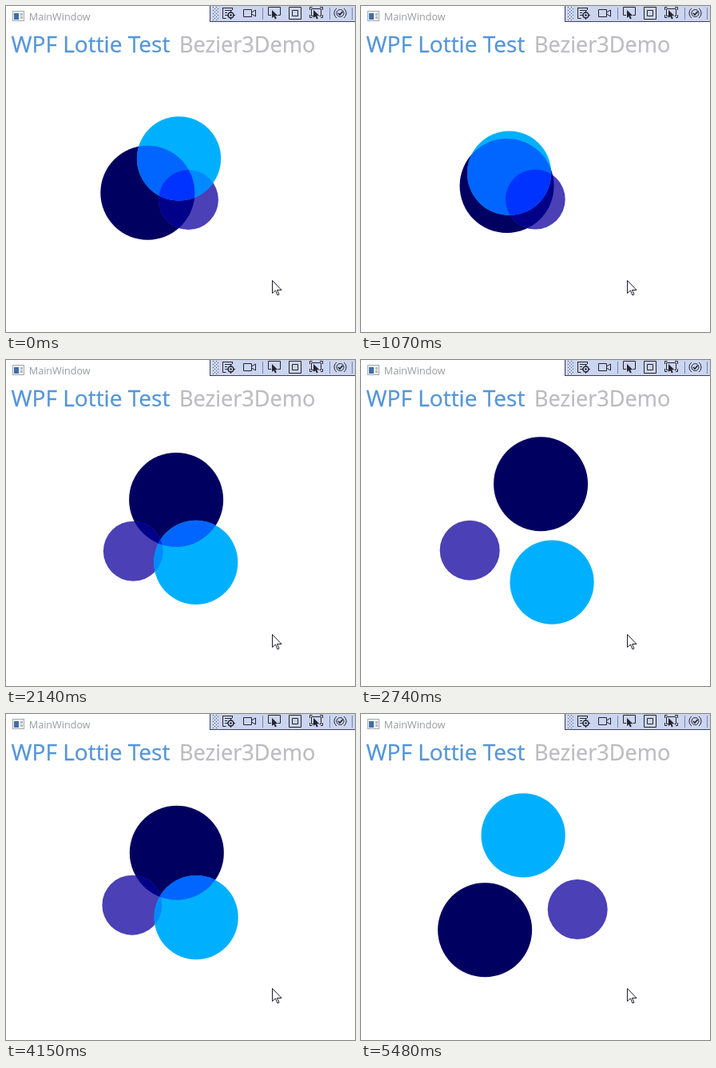
Recreate the animation shown at these times as an HTML page. Size 437 by 408 pixels, loop 5.55 s.

```html
<!DOCTYPE html>
<html lang="en">
<head>
<meta charset="utf-8">
<title>MainWindow</title>
<style>
  html, body { margin: 0; width: 100%; height: 100%; overflow: hidden; background: #fff; }
  svg { display: block; width: 437px; height: 408px; }
  text { font-family: "Open Sans", "Noto Sans", sans-serif; }
  .heading { stroke-width: .3; }
  .icon { fill: none; stroke: #22242e; stroke-width: 1; }
  .solid { fill: #22242e; stroke: none; }
</style>
</head>
<body>
<svg viewBox="0 0 437 408">
  <defs>
    <circle id="navy" r="59"/>
    <circle id="cyan" r="52.6"/>
    <circle id="violet" r="37.5"/>
    <clipPath id="inNavy"><use href="#navy"/></clipPath>
    <clipPath id="inViolet"><use href="#violet"/></clipPath>
    <pattern id="grip" x="259" y="1" width="4" height="4" patternUnits="userSpaceOnUse">
      <path d="M0 0h1v1h-1zM2 2h1v1h-1z" fill="#4a5270"/>
    </pattern>
    <path id="arrow" d="M0 0v10l2.300-2 1.700 3.500 1.800-.9-1.700-3.300h3.200z"/>
  </defs>

  <!-- title bar -->
  <rect x="8.5" y="6.5" width="14" height="12" fill="#f4f5f7" stroke="#a3a9b0"/>
  <rect x="10" y="9" width="6" height="8" fill="#3f6fa8"/>
  <path d="M18 9h3v3h-3zM18 13h3v3h-3z" fill="#b4bac2"/>
  <text x="28.800" y="17.500" font-size="12.600" fill="#999ba0">MainWindow</text>

  <!-- debug toolbar -->
  <rect x="255" width="182" height="20" fill="#38405f"/>
  <rect x="256" width="181" height="19" fill="#ccd5f0"/>
  <rect x="259" y="1" width="7" height="17" fill="url(#grip)"/>
  <path d="M321.500 2v15M405.500 2v15M433.500 2v15" stroke="#7884a8"/>
  <g class="icon">
    <path d="M271 2.500h13M271.500 2v13.500h4M274 5.500h9M274 8.500h3M274 11.500h2M283.500 2v3"/>
    <circle cx="281.500" cy="11.500" r="3.500" stroke-width="1.500"/>
    <path d="M281.500 6v3M281.500 14v3M276 11.500h3M284 11.500h3"/>
    <circle class="solid" cx="281.500" cy="11.500" r="1.300"/>
    <path d="M297.500 4.500h10v9h-10zM307.500 8l5-3v8l-5-3"/>
    <path d="M332 11.500h-3.500v-10h15v10h-3"/>
    <use class="solid" href="#arrow" x="333" y="5"/>
    <path d="M354.500 1.500h15v15h-15zM358.500 5.500h7v7h-7z"/>
    <path d="M385 12.500h-2.500v-9h12v9h-2M380.500 5v-3.500h3M393 1.500h3.500v3.500M380.500 11v3.500h3M394 14.500h2.500v-3.500"/>
    <use class="solid" href="#arrow" x="385" y="5"/>
    <path d="M414 3a7.500 7.500 0 0 0 0 12M423 3a7.500 7.500 0 0 1 0 12"/>
    <circle cx="418.500" cy="9" r="4.500"/>
    <path d="M416 9l2 2 3.500-4" stroke-width="1.700"/>
  </g>

  <!-- heading -->
  <text class="heading" x="6.500" y="58" font-size="28.100" fill="#5495d9" stroke="#5495d9">WPF Lottie Test</text>
  <text class="heading" x="217" y="58" font-size="27.100" fill="#bbbbc1" stroke="#bbbbc1">Bezier3Demo</text>

  <!-- discs, then the colours of their overlaps -->
  <use href="#navy" fill="#000060"/>
  <use href="#violet" fill="#4b40b5"/>
  <use href="#cyan" fill="#00b0ff"/>
  <g clip-path="url(#inNavy)">
    <use href="#violet" fill="#000089"/>
    <use href="#cyan" fill="#0066ff"/>
  </g>
  <g clip-path="url(#inViolet)">
    <use href="#cyan" fill="#008aff"/>
    <g clip-path="url(#inNavy)"><use href="#cyan" fill="#0033ff"/></g>
  </g>

  <path d="M333.500 343.500v16l4-3.500 2.500 6 2-1-2.500-5.500h5.500z" fill="#fff" stroke="#1c1c2c"/>
</svg>
<script>
  const LOOP = 5550, STEP = LOOP / 83, SWING = 1000, START = 455;

  const makePath = d => {
    const path = document.createElementNS("http://www.w3.org/2000/svg", "path");
    path.setAttribute("d", d);
    return path;
  };
  // Each disc has a way out and a way back.
  const routes = {
    navy: ["M155 270.5L227 152", "M227 152L155 270.5"],
    violet: ["M271.5 244.5L132.5 238", "M132.5 238L271.5 244.5"],
    cyan: ["M203.5 152C217 195 247 274 243.5 278",
           "M243.5 278C165 284 182 149 203.5 152"]
  };
  const discs = Object.entries(routes).map(([id, ways]) => ({
    node: document.getElementById(id),
    ways: ways.map(makePath)
  }));

  // cubic-bezier(.8, 0, .2, 1), solved by bisection
  function ease(x) {
    let low = 0, high = 1;
    for (let i = 0; i < 24; i++) {
      const s = (low + high) / 2, r = 1 - s;
      if (2.4 * r * r * s + 0.6 * r * s * s + s ** 3 < x) low = s; else high = s;
    }
    return low * low * (3 - 2 * low);
  }

  function draw(time) {
    const swings = (Math.floor((time % LOOP + 8) / STEP) % 83 * STEP + START) / SWING;
    const way = Math.floor(swings) % 2;
    const progress = ease(swings % 1);
    for (const { node, ways } of discs) {
      const path = ways[way];
      const { x, y } = path.getPointAtLength(progress * path.getTotalLength());
      node.setAttribute("cx", x);
      node.setAttribute("cy", y);
    }
  }

  const begin = performance.now();
  function tick() {
    draw(performance.now() - begin);
    requestAnimationFrame(tick);
  }
  tick();
</script>
</body>
</html>
```
